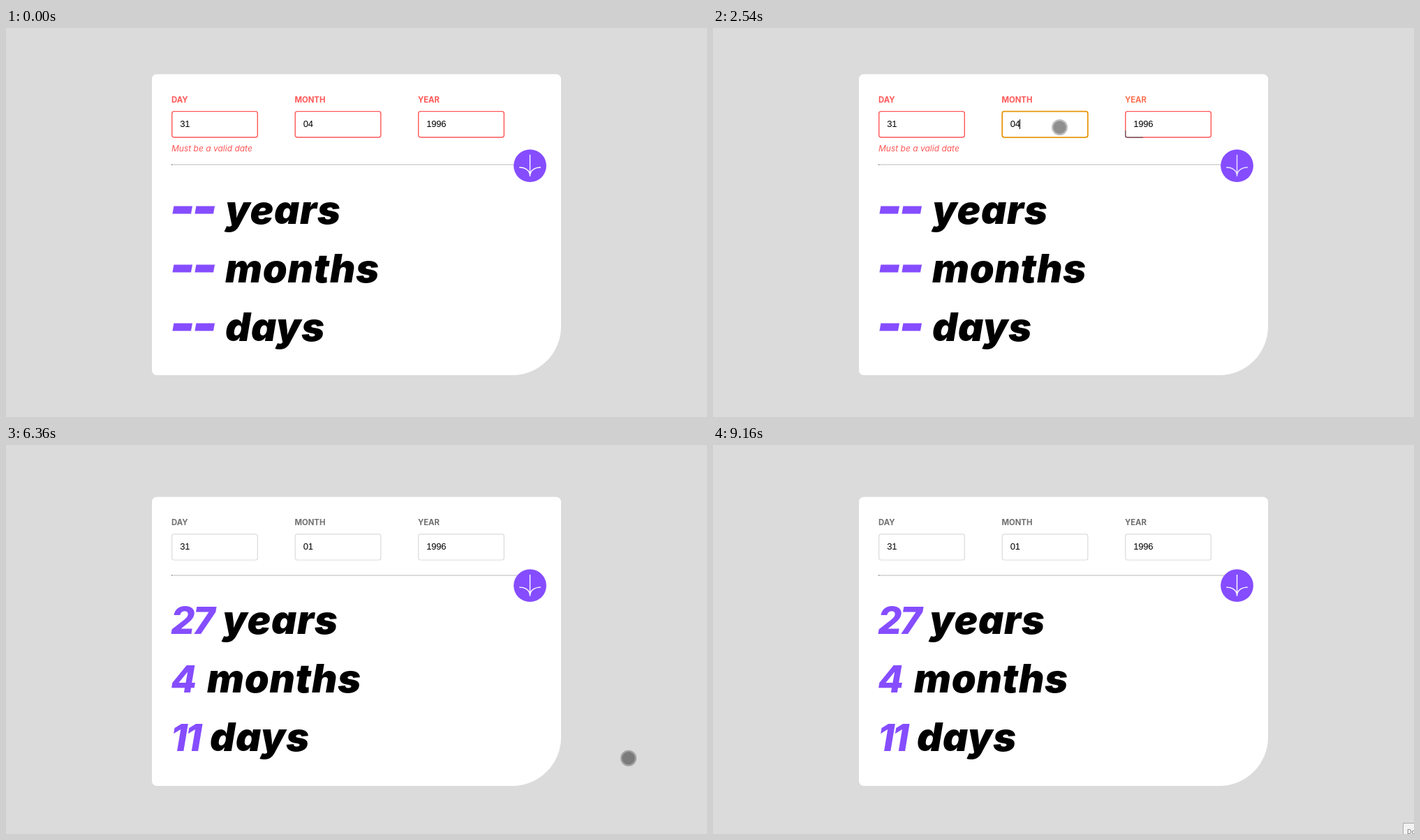
An HTML page for the animation above (9.21 s loop, 1004 by 558 pixels).

```html
<!DOCTYPE html>
<html lang="en">
<head>
<meta charset="utf-8">
<title>Age calculator</title>
<style>
  html, body { margin: 0; width: 100%; height: 100%; overflow: hidden; background: #dbdbdb; }
  svg { display: block; width: 100%; height: 100%; }
  text { font-family: Inter, "Open Sans", sans-serif; font-feature-settings: "cv11"; }
  .label { font-size: 11.3px; font-weight: 700; }
  .value { font: 13px "Liberation Sans", Arial, sans-serif; letter-spacing: -.2px; }
  .error { font-size: 12px; font-style: italic; fill: #ff5757; }
  .word { font-size: 56px; font-weight: 900; font-style: italic; letter-spacing: .8px; }
  .number { font-size: 54px; font-weight: 800; font-style: italic; letter-spacing: -3px; }
  .number, .dash { fill: #854dff; }
  .box { fill: #fff; }
  .invalid .label { fill: #ff5757; }
  .invalid .box { stroke: #ff5757; stroke-width: 1.4; }
  .valid .label { fill: #716f6f; }
  .valid .box { stroke: #dbdbdb; stroke-width: 1.2; }
  .focus .month .box { stroke: #e8960c; stroke-width: 1.8; }
  .focus .year .label { fill: #ff7050; }
  .focus .arrow { opacity: .85; }
  .trace { fill: none; stroke: #5c5560; stroke-width: 1.2; }
</style>
</head>
<body>
<svg id="stage" viewBox="0 0 1004 558"></svg>
<script>
const LOOP = 9210, STEP = 70, FOCUS = 2540, SUBMIT = 4900;
const LEFT = 237, COLUMN = 176.5, LINE = 84;

const text = (cls, x, y, s) => `<text class="${cls}" x="${x}" y="${y}">${s}</text>`;

const card = (top, bottom) =>
  `<path fill="#fff" d="M216 ${top}H788a7 7 0 0 1 7 7V${bottom - 70}a70 70 0 0 1-70 70H216a7 7 0 0 1-7-7V${top + 7}a7 7 0 0 1 7-7z"/>`;

const field = (name, i, value, dy) =>
  `<g class="${name}" transform="translate(${LEFT + i * COLUMN} ${dy})">
    ${text('label', 0, 107, name.toUpperCase())}
    <rect class="box" x=".7" y="119.6" width="122.6" height="37.2" rx="3"/>
    ${text('value', 12.2, 142, value)}</g>`;

const rule = y => `<path d="M${LEFT} ${y}H767" stroke="#d0d0d2" stroke-width="1.6"/>
  <path d="M${LEFT + 0.5} ${y - 1}v2" stroke="#8c8c8c"/>`;

const button = y => `<g transform="translate(750.5 ${y})"><circle r="23.4" fill="#854dff"/>
  <path class="arrow" transform="scale(.7) translate(-23 -22.5)" fill="none" stroke="#fff" stroke-width="2"
    d="M1 26C9 25.5 23 29 23 44V0M45 26C37 25.5 23 29 23 44"/></g>`;

const dashes = y => [0, 32].map(dx =>
  `<path class="dash" d="M${LEFT + 3.4 + dx} ${y - 25.4}h26.6l-2 10.8h-26.6z"/>`).join('');

const result = (word, number, x, y) =>
  (number ? text('number', LEFT - 1, y, number) : dashes(y)) + text('word', x, y, word);

function scene(id, { top, bottom, dy, line, disc, base, numbers, starts }) {
  const fields = ['day', 'month', 'year'].map((n, i) => field(n, i, ['31', '', '1996'][i], dy));
  const results = ['years', 'months', 'days'].map((w, i) => result(w, numbers[i], starts[i], base + i * LINE));
  return `<g id="${id}" class="${id}">${card(top, bottom)}${fields.join('')}
    ${rule(line)}${button(disc)}${results.join('')}</g>`;
}

const stage = document.getElementById('stage');
stage.innerHTML =
  scene('invalid', { top: 66.2, bottom: 498, dy: 0, line: 196, disc: 197.6, base: 281,
    numbers: [], starts: [314, 314, 314] }) +
  scene('valid', { top: 74.5, bottom: 489, dy: 8.2, line: 187, disc: 201.7, base: 271,
    numbers: [27, 4, 11], starts: [310, 288, 292] }) +
  `<g id="extras">${text('error', LEFT, 177.3, 'Must be a valid date')}
    <path id="yearTrace" class="trace" d="M590.7 147v8q0 1.8 2 1.8H616"/>
    <path id="monthTrace" class="trace" d="M536.8 145v9q0 2.8-2.8 2.8h-6"/>
    <path id="caret" d="M439.5 131v14" stroke="#000"/></g>
  <g id="tip"><rect x="988.5" y="542.5" width="40" height="30" fill="#f2f2f2" stroke="#a8a8a8"/>
    <text x="994" y="558" font-size="9" fill="#777">Da</text></g>
  <g id="cursor"><circle r="11.5" fill="#000" fill-opacity=".26"/><circle r="9.2" fill="#000" fill-opacity=".24"/></g>`;

const el = id => document.getElementById(id);
const show = (id, on) => { el(id).style.display = on ? '' : 'none'; };
const within = (t, a, b) => t >= a && t < b;
const monthValues = stage.querySelectorAll('.month .value');

// Each move starts where the last one ended; "via" bends it into a curve
const ENTRY = [845, 488];
const MOVES = [
  { start: 130, end: 740, to: [540, 154], via: [650, 230] },
  { start: 740, end: 1090, to: [660, 177] },
  { start: 1090, end: 1400, to: [548, 159] },
  { start: 1400, end: 1990, to: [750, 198] },
  { start: 2060, end: FOCUS, to: [496.5, 142.5] },
  { start: 4000, end: 4760, to: [768, 193], via: [633, 184] },
  { start: 5560, end: 5760, to: [800, 475] },
  { start: 6220, end: 6570, to: [929, 472], via: [897, 424] },
  { start: 6570, end: 7120, to: [619, 345], via: [900, 620] },
  { start: 7190, end: 7330, to: [567, 340] },
  { start: 7330, end: 7670, to: [667.5, 380.5] },
  { start: 7670, end: 8020, to: [1020, 575] }
];

function pointer(t) {
  const i = MOVES.findLastIndex(m => m.start <= t);
  if (i < 0) return ENTRY;
  const { start, end, to, via } = MOVES[i];
  if (t >= end) return to;
  const from = i ? MOVES[i - 1].to : ENTRY;
  const held = Math.floor((t - start) / STEP) * STEP;
  const k = Math.sin(held / (end - start) * Math.PI / 2);
  return from.map((a, n) => {
    const mid = via ? via[n] : (a + to[n]) / 2;
    return a * (1 - k) ** 2 + 2 * mid * k * (1 - k) + to[n] * k * k;
  });
}

function draw(t) {
  const done = t >= SUBMIT;
  show('invalid', !done);
  show('valid', done);
  show('extras', !done);
  el('invalid').classList.toggle('focus', t >= FOCUS);

  const month = t < 3350 ? '04' : t < 3480 ? '0' : '01';
  monthValues.forEach(m => { m.textContent = month; });
  show('caret', within(t, FOCUS, 2870) || within(t, 3350, 3950));
  el('caret').setAttribute('transform', `translate(${(month.length - 2) * 7} 0)`);

  show('yearTrace', t >= 880);
  show('monthTrace', within(t, 810, FOCUS));
  show('tip', t >= 9160);

  show('cursor', within(t, 130, 8020));
  el('cursor').setAttribute('transform', `translate(${pointer(t)})`);
}

function tick() {
  draw(performance.now() % LOOP);
  requestAnimationFrame(tick);
}
tick();
</script>
</body>
</html>
```
